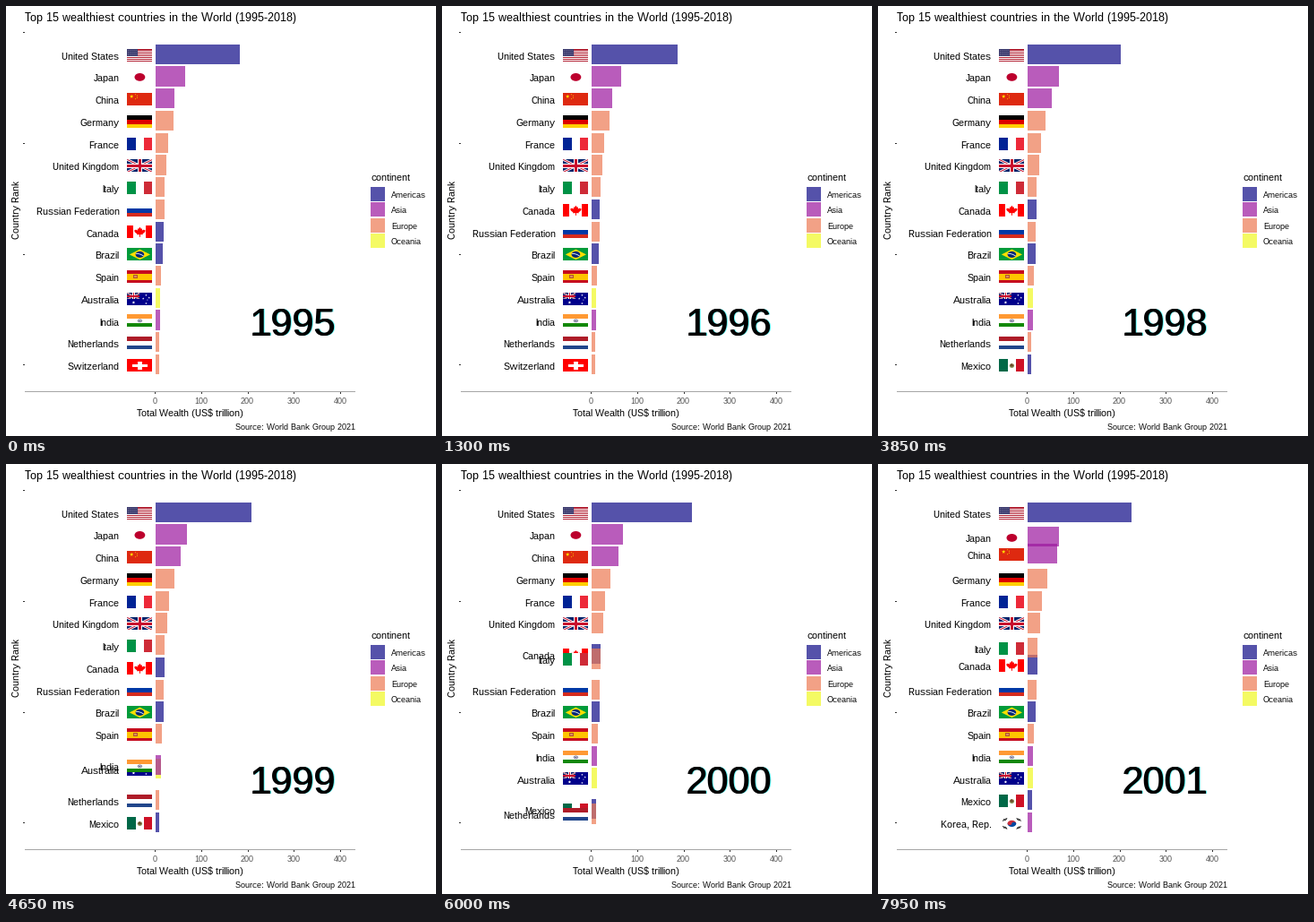
A matplotlib script for the animation above (8 s loop, 480 px wide and 480 px high).

```python
import math

import numpy as np
import matplotlib.pyplot as plt
from matplotlib.animation import FuncAnimation
from matplotlib.lines import Line2D
from matplotlib.patches import Circle, Ellipse, Polygon, Rectangle
from matplotlib.transforms import Affine2D

plt.rcParams.update({
    "font.family": "Liberation Sans",
    "text.hinting": "native",
    "text.hinting_factor": 1,
})

FRAMES, INTERVAL = 160, 50
STEP = 26                      # frames from one year to the next
FIRST_YEAR = 1995
FLAG_X, FLAG_W, FLAG_H = 135, 28, 14
PX = 0.75                      # points per pixel at 96 dpi

CONTINENTS = {"Americas": "#0D0887", "Asia": "#9C179E",
              "Europe": "#ED7953", "Oceania": "#F0F921"}

# Continent and wealth (US$ trillion) at evenly spaced times, 1995 to 2002
COUNTRIES = {
    "United States": ("Americas", (182.6, 187.2, 194.2, 203, 212.2, 219.3, 225, 229)),
    "Japan": ("Asia", (64, 65, 68.1, 68, 68, 68, 68, 68)),
    "China": ("Asia", (41, 45, 50.5, 52.7, 56, 60, 64.3, 68.5)),
    "Germany": ("Europe", (38.8, 40.5, 43.2)),
    "France": ("Europe", (27.5, 29.2, 32.6)),
    "United Kingdom": ("Europe", (23.6, 25.3, 28.9)),
    "Italy": ("Europe", (19.6, 20.3, 22.3)),
    "Russian Federation": ("Europe", (19.3, 18, 18, 19.4, 20.3)),
    "Canada": ("Americas", (18.5, 20, 23)),
    "Brazil": ("Americas", (16.3, 17.4, 18.5)),
    "Spain": ("Europe", (12.3, 13.6, 14.8)),
    "Australia": ("Oceania", (10.6, 11.7, 12.8)),
    "India": ("Asia", (10.1, 11.85, 13)),
    "Netherlands": ("Europe", (8.8, 9.3, 10.3)),
    "Switzerland": ("Europe", (8.5, 8.5)),
    "Mexico": ("Americas", (8, 9.2, 11)),
    "Korea, Rep.": ("Asia", (8, 9.5, 11)),
}

# Pairs that trade places (or enter for one another) in each later year
TRADES = [
    [("Canada", "Russian Federation")],
    [("Mexico", "Switzerland")],
    [],
    [("India", "Australia")],
    [("Canada", "Italy"), ("Mexico", "Netherlands")],
    [("Canada", "Italy"), ("Korea, Rep.", "Netherlands")],
    [("Canada", "Italy"), ("China", "Japan")],
]


def yearly_ranks():
    order = list(COUNTRIES)
    tables = []
    for trades in [[]] + TRADES:
        for a, b in trades:
            i, j = order.index(a), order.index(b)
            order[i], order[j] = b, a
        tables.append({name: r for r, name in enumerate(order[:15], 1)})
    return tables


RANKS = yearly_ranks()

fig = plt.figure(figsize=(5, 5), dpi=96, facecolor="white")
ax = fig.add_axes([0, 0, 1, 1])
ax.set(xlim=(0, 480), ylim=(480, 0))
ax.axis("off")


def x_of(value):
    return 166.6 + 0.5175 * value


def y_of(rank):
    return 29.5 + 24.74 * rank


def write(x, y, text, size, color="black", ha="left", **kw):
    return ax.text(x, y, text, fontsize=size * PX, color=color, ha=ha,
                   va="baseline", **kw)


def box(x, y, w, h, color, **kw):
    return ax.add_patch(Rectangle((x, y), w, h, fc=color, lw=0, aa=False, **kw))


class Flag:
    """A small flag, drawn in its own 28 by 14 pixel space."""

    def __init__(self, zorder):
        self.move = Affine2D()
        place = self.move + ax.transData
        self.kw = dict(transform=place, zorder=zorder)
        # Curved and slanted shapes sit a little off the pixel grid
        self.soft = dict(transform=Affine2D().translate(0.4, 0.4) + place,
                         zorder=zorder)
        self.parts = []
        self.rect(0, 0, FLAG_W, FLAG_H, "white")

    def add(self, patch):
        ax.add_patch(patch)
        self.parts.append(patch)
        return patch

    def rect(self, x, y, w, h, color):
        """A rectangle whose edges are rounded up to whole pixels."""
        x0, y0, x1, y1 = (math.ceil(v - 0.01) for v in (x, y, x + w, y + h))
        return self.add(Rectangle((x0, y0), x1 - x0, y1 - y0, fc=color, lw=0,
                                  **self.kw))

    def dot(self, x, y, r, color):
        self.add(Circle((x, y), r, fc=color, lw=0, **self.soft))

    def oval(self, x, y, w, h, color):
        self.add(Ellipse((x, y), w, h, fc=color, lw=0, **self.soft))

    def poly(self, points, color):
        self.add(Polygon(points, fc=color, lw=0, **self.soft))

    def star(self, x, y, r, color):
        a = np.arange(10) * np.pi / 5
        rad = np.where(np.arange(10) % 2, 0.45 * r, r)
        self.poly(np.c_[x + rad * np.sin(a), y - rad * np.cos(a)], color)

    def line(self, xs, ys, width, color, clip=None):
        line = ax.add_line(Line2D(xs, ys, lw=width * PX, color=color,
                                  solid_capstyle="butt", **self.soft))
        if clip is not None:
            line.set_clip_path(clip)
        self.parts.append(line)

    def rows(self, *colors):
        h = FLAG_H / len(colors)
        for i, c in enumerate(colors):
            self.rect(0, i * h, FLAG_W, h, c)

    def columns(self, *colors):
        w = FLAG_W / len(colors)
        for i, c in enumerate(colors):
            self.rect(i * w, 0, w, FLAG_H, c)

    def union(self, w, h):
        field = self.rect(0, 0, w, h, "#012169")
        for width, color in ((0.2, "white"), (0.07, "#C8102E")):
            for ys in ((0, h), (h, 0)):
                self.line((0, w), ys, width * h, color, field)
        for t, color in ((0.32, "white"), (0.19, "#C8102E")):
            self.rect(0, h * (1 - t) / 2, w, h * t, color)
            self.rect((w - h * t) / 2, 0, h * t, h, color)


def usa(f):
    f.rows(*["#B22234" if i % 2 == 0 else "white" for i in range(13)])
    f.rect(0, 0, 11.2, 7.5, "#3C3B6E")
    for row in range(4):
        for col in range(5):
            f.dot(1.3 + 2.1 * col, 1.1 + 1.8 * row, 0.35, "#C8C8DC")


def japan(f):
    f.oval(14, 7, 11.8, 8.8, "#BC002D")


def china(f):
    f.rows("#DE2910")
    f.star(4.8, 3.6, 2.2, "#FFDE00")
    for x, y in ((9.2, 1.4), (11, 2.8), (11, 4.9), (9.2, 6.3)):
        f.dot(x, y, 0.5, "#FFDE00")


def germany(f):
    f.rows("black", "#DD0000", "#FFCE00")


def france(f):
    f.columns("#002395", "white", "#ED2939")


def britain(f):
    f.union(FLAG_W, FLAG_H)


def italy(f):
    f.columns("#009246", "white", "#CE2B37")


def russia(f):
    f.rows("white", "#0039A6", "#D52B1E")


def canada(f):
    f.rect(0, 0, 7, FLAG_H, "red")
    f.rect(21, 0, 7, FLAG_H, "red")
    half = [(0, 1.3), (1.4, 3.4), (2.6, 3), (2.4, 5.2), (4.4, 4.2), (6.3, 5.2),
            (5.6, 7), (3.1, 9), (3.2, 9.9), (0.5, 9.7), (0.5, 12.4)]
    f.poly([(14 + x, y) for x, y in half]
           + [(14 - x, y) for x, y in half[::-1]], "red")


def brazil(f):
    f.rows("#009B3A")
    f.poly([(2.4, 7), (14, 1.2), (25.6, 7), (14, 12.8)], "#FEDF00")
    f.oval(14, 7, 9.6, 7, "#002776")
    f.line((9.6, 12, 15, 18.2), (6.3, 6.1, 6.9, 8.6), 0.8, "white")


def spain(f):
    f.rows("#C60B1E", "#FFC400", "#FFC400", "#C60B1E")
    f.rect(7, 5, 5, 4, "#B5532B")
    f.rect(8, 6, 3, 2, "#D98C5F")


def australia(f):
    f.rows("#00008B")
    f.union(14, 7)
    f.star(7, 10.6, 1.8, "white")
    for x, y in ((21, 2.4), (17.8, 6.2), (24.3, 5.2), (21, 11.6)):
        f.star(x, y, 1.2, "white")
    f.dot(22.5, 7.7, 0.5, "white")


def india(f):
    f.rows("#FF9933", "white", "#138808")
    f.oval(14, 7, 5, 3.6, "#55557C")
    f.oval(14, 7, 3.4, 2.2, "white")
    f.oval(14, 7, 1.6, 1.2, "#30306C")


def netherlands(f):
    f.rows("#AE1C28", "white", "#21468B")


def switzerland(f):
    f.rows("red")
    f.rect(5.25, 5.7, 17.5, 2.6, "white")
    f.rect(11.4, 2.6, 5.2, 8.8, "white")


def mexico(f):
    f.columns("#006847", "white", "#CE1126")
    f.oval(14, 7.2, 5.4, 4.8, "#8F9A62")
    f.oval(14, 6.6, 3.8, 3.4, "#6B4A2A")
    f.dot(15.2, 5.2, 0.7, "#C9B59A")


def korea(f):
    a = np.linspace(0, np.pi, 20)
    for sign, color in ((-1, "#CD2E3A"), (1, "#0047A0")):
        f.poly(np.c_[14 + 4.8 * np.cos(a), 7 + sign * 3.6 * np.sin(a)], color)
    f.oval(11.6, 7, 4.8, 3.4, "#CD2E3A")
    f.oval(16.4, 7, 4.8, 3.4, "#0047A0")
    for sx in (-1, 1):
        for sy in (-1, 1):
            for d in (0, 1.5, 3):
                x, y = 14 + sx * (6.2 + d), 7 + sy * (4.9 - 0.3 * d)
                dx, dy = 0.9, -1.3 * sx * sy
                f.line((x - dx, x + dx), (y - dy, y + dy), 0.8, "black")


DRAW = dict(zip(COUNTRIES, (
    usa, japan, china, germany, france, britain, italy, russia, canada, brazil,
    spain, australia, india, netherlands, switzerland, mexico, korea)))


class Row:
    """Bar, label and flag of one country."""

    def __init__(self, name, depth):
        continent, wealth = COUNTRIES[name]
        self.name = name
        self.wealth = wealth
        self.knots = np.linspace(0, 7, len(wealth))
        self.bar = box(167, 0, 1, 1, CONTINENTS[continent], alpha=0.7,
                       zorder=2 + depth / 100)
        self.label = write(126.5, 0, name, 11, ha="right", zorder=3)
        self.flag = Flag(4 + depth / 100)
        DRAW[name](self.flag)
        self.parts = [self.bar, self.label, *self.flag.parts]

    def update(self, t):
        year = int(t)
        start = RANKS[year].get(self.name)
        for part in self.parts:
            part.set_visible(start is not None)
        if start is None:
            return
        end = RANKS[year + 1].get(self.name, start)
        y = y_of(start + (end - start) * (t - year))
        top, bottom = int(y - 11.13), int(y + 11.13)
        right = round(x_of(np.interp(t, self.knots, self.wealth)))
        self.bar.set_bounds(167, top, right - 167, bottom - top)
        self.label.set_y(y + 5.4)
        self.flag.move.clear().translate(FLAG_X, round(y - 6.68))


def year_text():
    """Heavy digits with a cyan fringe on their right edges."""
    layers = ((2, "#00FFFF", 0.6, 5), (0, "black", 1, 6), (1, "black", 1, 6))
    return [write(272 + dx, 368, "", 44, color=c, alpha=a, zorder=z)
            for dx, c, a, z in layers]


def draw_chart_frame():
    write(21, 17, "Top 15 wealthiest countries in the World (1995-2018)", 13)
    write(206, 458, "Total Wealth (US$ trillion)", 11, ha="center")
    write(390, 473, "Source: World Bank Group 2021", 9, ha="right")
    write(15, 228, "Country Rank", 11, ha="center", rotation=90,
          rotation_mode="anchor")
    box(21, 430, 369, 1, "#A6A6A6")
    for value in range(0, 401, 100):
        x = x_of(value)
        box(int(x), 431, 1, 2, "#333333")
        write(x - 0.6, 444, str(value), 9, color="#4D4D4D", ha="center")
    for rank in (0, 5, 10, 15):
        box(19, int(y_of(rank) + 0.2), 2, 1, "#333333")
    write(407, 195, "continent", 11)
    for i, (name, color) in enumerate(CONTINENTS.items()):
        box(407, round(202 + 17.28 * i), 16, 16, color, alpha=0.7)
        write(430, 214 + 17.28 * i, name, 9)


draw_chart_frame()
rows = [Row(name, i) for i, name in enumerate(sorted(COUNTRIES))]
current, leaving = year_text(), year_text()


def update(frame):
    t = frame / STEP
    for row in rows:
        row.update(t)
    year, past_half = frame // STEP, frame % STEP >= STEP // 2
    # A country about to drop out keeps its old year until it is gone
    drops = set(RANKS[year]) - set(RANKS[year + 1])
    for text in current:
        text.set_text(str(FIRST_YEAR + year + past_half))
    for text in leaving:
        text.set_text(str(FIRST_YEAR + year) if drops and past_half else "")
    return []


anim = FuncAnimation(fig, update, frames=FRAMES, interval=INTERVAL,
                     init_func=lambda: update(0), repeat=True, repeat_delay=0)
plt.show()
```
